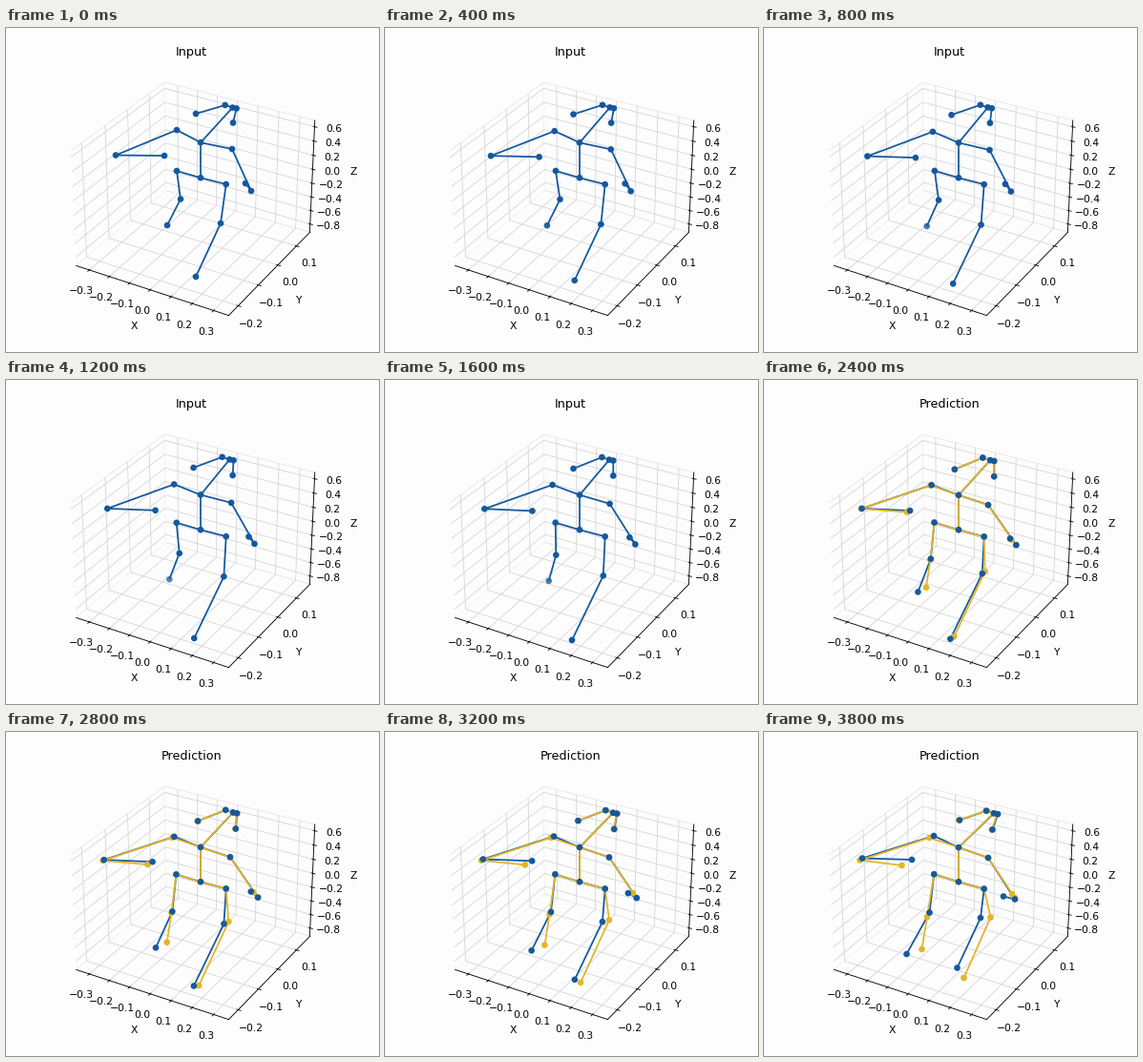
These frames come from a looping animation (391x340 px, 4000 ms). A matplotlib script:

```python
import numpy as np
import matplotlib.pyplot as plt
from matplotlib.animation import FuncAnimation
from matplotlib.collections import LineCollection

W, H, DPI = 391, 340, 77
FRAMES, STEP = 20, 200
SWITCH, END = 2.0, 3.8  # seconds: forecast appears, last pose
BLUE, GOLD, PAPER = "#14589f", "#e4b526", "#fdfdfd"

plt.rcParams.update({"font.family": "DejaVu Sans", "grid.color": "#d6d6d6"})

# Each limb: easing power before and after the switch, sideways sway of the
# first half, and every joint's start, switch and end point in pixels
LIMBS = [
    (0.7, 1.0, (0, 0), {
        "l_shoulder": [(179, 107), (175, 110.5), (178, 109)],
        "l_elbow": [(115, 133.5), (102.5, 135.5), (103, 132.5)],
        "l_hand": [(166, 134), (152.5, 138), (155, 134)]}),
    (1.5, 1.8, (0, 0), {
        "r_shoulder": [(237, 127), (235, 131), (235, 132)],
        "r_elbow": [(257, 171), (264.5, 173), (263, 175.5)],
        "r_hand": [(251, 163), (258.5, 166), (251, 172.5)]}),
    (2.0, 0.5, (1.3, 0), {
        "l_knee": [(183, 179.5), (176, 186), (173.5, 189.5)],
        "l_foot": [(169, 207), (172, 213), (149.5, 233)]}),
    (1.0, 1.5, (1, 2), {
        "r_knee": [(225, 205), (229, 204), (227, 195)],
        "r_foot": [(199, 261), (194.5, 274.5), (202.5, 247.5)]}),
    (1.0, 1.3, (-2.6, -0.4), {
        "nose": [(237.5, 83.5), (236.5, 84), (241, 85.3)],
        "l_ear": [(199, 90), (199, 94), (205, 92.5)],
        "r_ear": [(238, 99.5), (241.5, 101), (239.5, 102.5)]}),
]

# Where the forecast ends up
FORECAST = {
    "l_shoulder": (173.5, 111), "l_elbow": (100.5, 134.5), "l_hand": (144.5, 140),
    "r_shoulder": (235, 132), "r_elbow": (263, 174), "r_hand": (260, 170),
    "l_knee": (171, 194), "l_foot": (165.5, 228),
    "r_knee": (237.5, 194.5), "r_foot": (209.5, 258),
}

CHAINS = [
    ["neck", "pelvis"],
    ["l_foot", "l_knee", "l_hip", "pelvis", "r_hip", "r_knee", "r_foot"],
    ["l_hand", "l_elbow", "l_shoulder", "neck", "r_shoulder", "r_elbow", "r_hand"],
    ["neck", "nose", "l_eye", "l_ear"],
    ["nose", "r_eye", "r_ear"],
]
JOINTS = sorted({name for chain in CHAINS for name in chain})


def observed(t):
    early = min(t / SWITCH, 1)
    late = max((t - SWITCH) / (END - SWITCH), 0)
    pose = {}
    for p_early, p_late, sway, joints in LIMBS:
        bow = np.sin(np.pi * early) * np.array(sway)
        for name, points in joints.items():
            a, b, c = np.array(points, float)
            pose[name] = a + (b - a) * early ** p_early + (c - b) * late ** p_late + bow
    pose["l_eye"] = pose["nose"] + (-7.8, -2.6)
    pose["r_eye"] = pose["nose"] + (4.1, 0.9)
    pose["neck"] = np.array([204, 120.2 + 0.25 * t])
    pose["pelvis"] = np.array([204, 157.2])
    pose["l_hip"] = np.array([179 - 0.2 * t, 150 - 0.2 * t])
    pose["r_hip"] = np.array([230.7, 164 + 0.15 * t])
    return pose


def forecast(t):
    """Same body, but the limbs drift straight from the switch pose."""
    pose, base = observed(t), observed(SWITCH)
    s = 0.12 + 0.88 * (t - SWITCH) / (END - SWITCH)
    for name, goal in FORECAST.items():
        pose[name] = base[name] + (np.array(goal) - base[name]) * s
    for name in ("nose", "l_eye", "r_eye", "l_ear", "r_ear"):
        pose[name] = pose[name] + (-0.4 * (t - SWITCH), 0)
    return pose


class Skeleton:
    def __init__(self, ax, color, zorder):
        self.bones = LineCollection([], colors=color, linewidths=1.65, zorder=zorder)
        ax.add_collection(self.bones)
        self.dots = ax.scatter(np.zeros(len(JOINTS)), np.zeros(len(JOINTS)),
                               s=6.2 ** 2, c=color, linewidths=0)

    def show(self, pose, alpha, zorder):
        self.bones.set_segments([[pose[n] for n in chain] for chain in CHAINS])
        self.dots.set_offsets([pose[n] for n in JOINTS])
        self.dots.set_alpha([alpha if n == "l_foot" else 1 for n in JOINTS])
        self.dots.set_zorder(zorder)

    def set_visible(self, on):
        self.bones.set_visible(on)
        self.dots.set_visible(on)


fig = plt.figure(figsize=((W + 1e-3) / DPI, (H + 1e-3) / DPI), dpi=DPI, facecolor=PAPER)
SIDE = 284.6
box = fig.add_axes([52.1 / W, 20.4 / H, SIDE / W, SIDE / H], projection="3d", facecolor="none")
box.set(xlim=(-0.3665, 0.3695), ylim=(-0.245, 0.174), zlim=(-0.926, 0.687),
        xlabel="X", ylabel="Y", zlabel="Z")
box.set_xticks(np.arange(-3, 4) / 10)
box.set_yticks(np.arange(-2, 2) / 10)
box.set_zticks(np.arange(-4, 4) / 5)
for axis in (box.xaxis, box.yaxis, box.zaxis):
    axis.set_pane_color(PAPER)
    axis.pane.set_edgecolor("#ebebeb")
title = box.set_title("Input", fontsize=11.9)

stage = fig.add_axes([0, 0, 1, 1], facecolor="none")
stage.axis("off")
truth = Skeleton(stage, BLUE, 2)
guess = Skeleton(stage, GOLD, 3)
stage.set(xlim=(0, W), ylim=(H, 0))


def draw(frame):
    t = frame * STEP / 1000
    predicting = t >= SWITCH
    title.set_text("Prediction" if predicting else "Input")
    fade = 1 - 0.3 * np.exp(-((t - 1.2) / 0.7) ** 2)  # far foot dims with depth
    truth.show(observed(t), fade, 5)
    guess.set_visible(predicting)
    if predicting:
        guess.show(forecast(t), 1, 6 if t == SWITCH else 4)
    return truth.bones, truth.dots, guess.bones, guess.dots, title


anim = FuncAnimation(fig, draw, frames=FRAMES, interval=STEP, repeat=True, repeat_delay=0)
plt.show()
```
